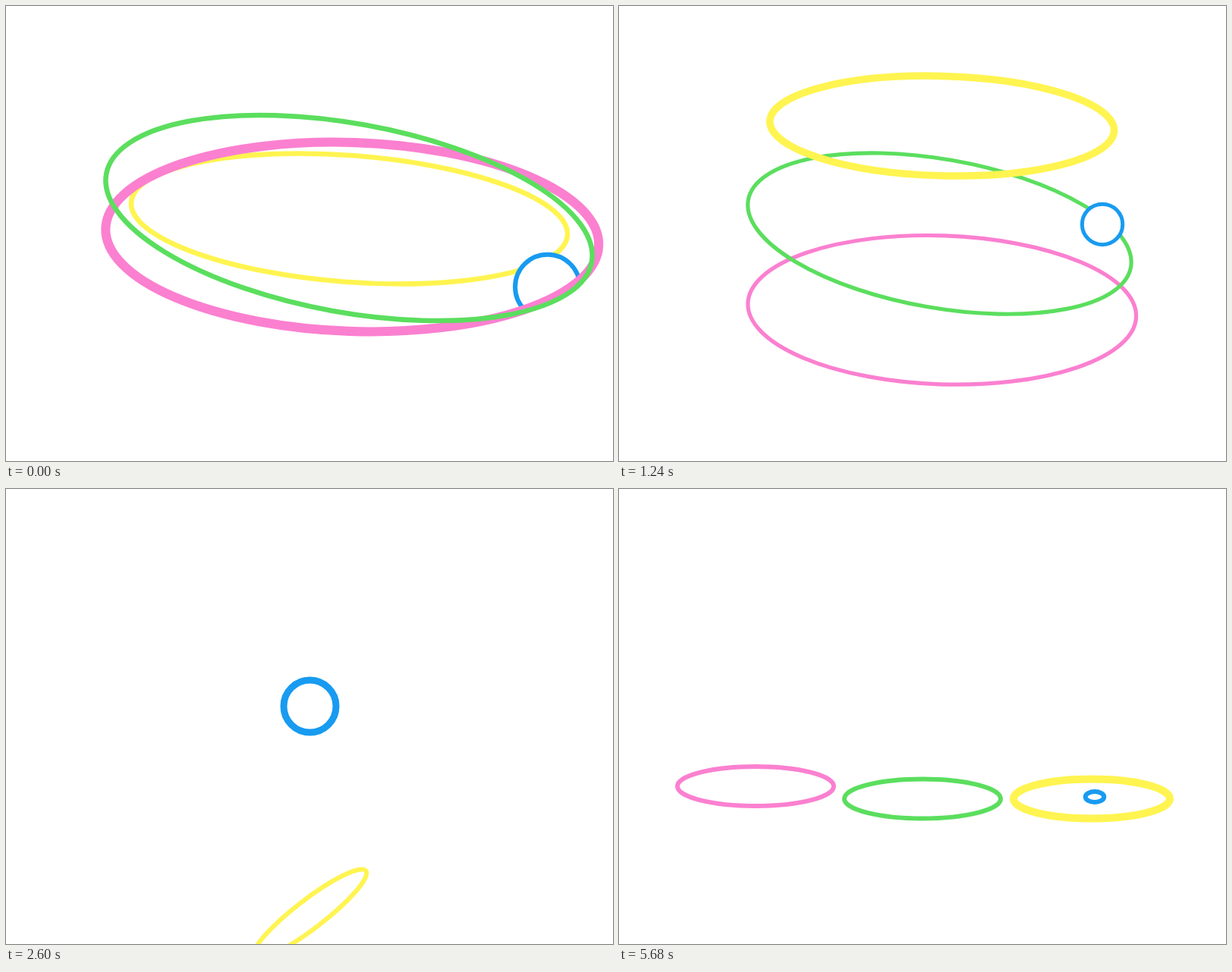
Recreate the animation shown at these times as an HTML page with a canvas. Size 800 by 600 pixels, loop 5.72 s.

```html
<!DOCTYPE html>
<html lang="en">
<head>
<meta charset="utf-8">
<title>Hoops and ball</title>
<style>
  html, body { margin: 0; width: 100%; height: 100%; overflow: hidden; background: #fff; }
  canvas { display: block; width: 800px; height: 600px; }
</style>
</head>
<body>
<canvas id="stage" width="800" height="600"></canvas>
<script>
const ctx = document.getElementById('stage').getContext('2d');
const LOOP = 5720, STEP = 40, CUT = 2560, TAU = Math.PI * 2;
const PINK = '#fb80d0', GREEN = '#5bde5e', YELLOW = '#fff450', BLUE = '#189bf0';

const lerp = (a, b, p) => a + (b - a) * p;
const span = (t, a, b) => Math.min(1, Math.max(0, (t - a) / (b - a)));
const ramp = (t, a, b) => {
  const p = span(t, a, b);
  return p * p * (3 - 2 * p);
};

function hoopPath(h) {
  ctx.beginPath();
  ctx.ellipse(h.x, h.y, h.a, h.b, h.deg * Math.PI / 180, 0, TAU);
}

function drawHoop(h) {
  hoopPath(h);
  ctx.strokeStyle = h.color;
  ctx.lineWidth = h.w;
  ctx.stroke();
}

function drawBall(x, y, rx, ry, w) {
  ctx.beginPath();
  ctx.ellipse(x, y, rx, ry, 0, 0, TAU);
  ctx.fillStyle = '#fff';
  ctx.fill();
  ctx.strokeStyle = BLUE;
  ctx.lineWidth = w;
  ctx.stroke();
}

// A point on the rim at angle u, pulled in by the hoop's own factor
function rimPoint(h, u) {
  const d = h.deg * Math.PI / 180;
  const px = h.a * h.pull * Math.cos(u), py = h.b * h.pull * Math.sin(u);
  return [h.x + px * Math.cos(d) - py * Math.sin(d), h.y + px * Math.sin(d) + py * Math.cos(d)];
}

// Big swinging hoops; the ball circles their rims and climbs from one to the next
const CLIMB = [460, 1180];

function swingScene(t) {
  const zoom = lerp(1.27, 1, ramp(t, 740, 900));
  const orbit = TAU * t / 306.7, lean = Math.cos(orbit);
  const drop = ramp(t, 200, 920);
  const grow = lerp(0.5, 1, ramp(t, 920, 1500));
  const lift = t < 920 ? 0 : grow * (0.5 - 0.5 * Math.cos(TAU * (t - 920) / 570));
  const active = CLIMB.filter(c => t >= c).length;

  const hoop = (i, color, a, b, y, deg, dx, lag, pull) => ({
    color, y, deg, pull,
    x: 400 + (13.5 + dx + 30 * Math.cos(TAU * t / 389 - lag)) * zoom,
    a: a * zoom, b: b * zoom, w: (i === active ? 9.5 : 5.2) * zoom
  });
  const pink = hoop(0, PINK, 256, 98, lerp(304.5, 397 + 4 * lean, drop), 2, 0.8, 0, 0.92);
  const green = hoop(1, GREEN, 256, 98, lerp(279.5, 355.5, drop) - 73 * lift, 1.3 + 9 * lean, -2.5, 0, 0.86);
  const yellow = hoop(2, YELLOW, 227, 65.7, lerp(280.5, 305.5, drop) - 194 * lift,
    2.7 * (lean - drop) + 1.65, -2, 0.1, 1.02);

  const u = 0.52 - orbit;
  const hoops = [pink, green, yellow];
  let [x, y] = rimPoint(hoops[active], u);
  if (active) {
    const [fx, fy] = rimPoint(hoops[active - 1], u);
    const p = ramp(t - CLIMB[active - 1], 0, 140);
    x = lerp(fx, x, p);
    y = lerp(fy, y, p);
  }
  const r = (24 + 11 * Math.sin(u)) * zoom * (active ? 1 : 1.14);

  if (active === 0) {
    drawHoop(yellow);
    ctx.save();
    hoopPath(pink);
    ctx.clip();
    drawBall(x, y, r, r, 6);
    ctx.restore();
    drawHoop(pink);
    drawHoop(green);
  } else {
    (active === 1 ? [pink, yellow, green] : hoops).forEach(drawHoop);
    drawBall(x, y, r, r, 5);
  }
}

// The ball lands every BEAT at the next stop, each hop a little higher
const HOP = 3400, BEAT = 456, STOPS = [400, 400, 254, 400, 622, 627];
const landing = n => HOP + n * BEAT;

function ballAt(t) {
  if (t < HOP) return [400.5, 286.5];
  const n = Math.min(STOPS.length - 2, Math.floor((t - HOP) / BEAT));
  const p = span(t, landing(n), landing(n + 1));
  const high = 391 - 67 * 0.5 ** (n - 1);
  const floor = n ? 406 : lerp(286.5, 406, p);
  return [lerp(STOPS[n], STOPS[n + 1], p * p), floor - high * 4 * p * (1 - p)];
}

// A small hoop spins up from below, then is tossed to its slot and falls flat
function smallHoop(t, color, w, h) {
  const up = 1 - (1 - span(t, h.start, 3720)) ** 2;
  const toss = span(t, 3760, h.flatAt);
  const fall = toss ** 3.2;
  return {
    color, w,
    x: lerp(lerp(380, h.x, up), h.slot, toss),
    y: lerp(lerp(700, h.y, up), 392, fall * fall),
    a: 103 * lerp(0.85, 1, up),
    b: lerp(lerp(15, h.b, up), 26, toss),
    deg: lerp(h.deg + 146 * (1 - up), h.flat, fall)
  };
}

function bounceScene(t) {
  const pinkHit = t >= landing(2) && t < landing(3) + 160;
  const pink = smallHoop(t, pinkHit ? GREEN : PINK, t >= 3680 && t < 4000 ? 10 : 6,
    { start: 3200, x: 400, y: 348, b: 21, deg: 26.6, slot: 254.5, flat: 0, flatAt: 4200 });
  const green = smallHoop(t, GREEN, 6,
    { start: 3000, x: 400.5, y: 347.5, b: 20, deg: -17, slot: 400, flat: 0, flatAt: 4740 });
  const yellow = smallHoop(t, YELLOW, t >= landing(4) ? 10 : 6,
    { start: 2320, x: 437, y: 312, b: 26, deg: -131, slot: 623, flat: -180, flatAt: 4200 });

  pink.x -= 74.5 * ramp(t, landing(3), 5120);
  green.y += 16.5 * ramp(t, landing(3), 4840);
  yellow.y += 16.5 * ramp(t, 5600, landing(5));
  [pink, green, yellow].forEach(drawHoop);

  const [x, y] = ballAt(t);
  const shrink = ramp(t, 2600, 3100);
  const r = lerp(34.5, 12.3, shrink);
  drawBall(x, y, r, r * lerp(1, 0.56, ramp(t, 5620, landing(5))), lerp(9, 6, shrink));
}

function frame(now) {
  const t = Math.floor((now % LOOP) / STEP) * STEP;
  ctx.fillStyle = '#fff';
  ctx.fillRect(0, 0, 800, 600);
  (t < CUT ? swingScene : bounceScene)(t);
}

const start = performance.now();
function tick() {
  frame(performance.now() - start);
  requestAnimationFrame(tick);
}
tick();
</script>
</body>
</html>
```
